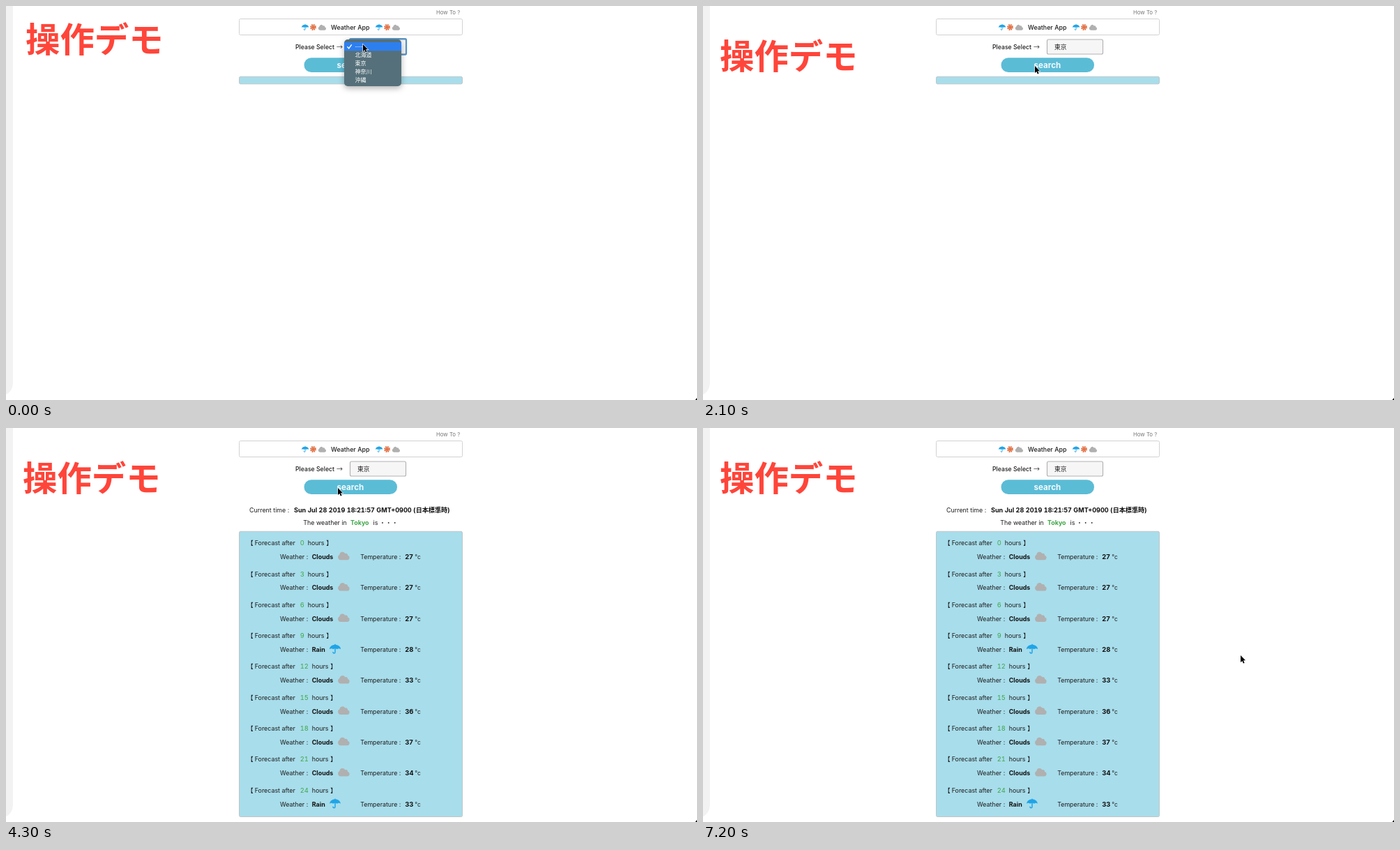
These frames come from a looping animation (991x565 px, 7.3 s). An HTML page:

```html
<!DOCTYPE html>
<html lang="ja">
<head>
<meta charset="utf-8">
<title>Weather App</title>
<style>
  html, body { margin: 0; width: 100%; height: 100%; overflow: hidden; background: #fff; }
  svg { display: block; width: 991px; height: 565px; }
  text { font: 8.9px Inter, "Noto Sans CJK JP", "Noto Sans CJK", sans-serif; fill: #1c1c1c; white-space: pre; }
  .b { font-weight: 700; fill: #111; }
  .g { fill: #3fa648; }
  .jp { font-family: "Noto Sans CJK JP", "Noto Sans CJK", sans-serif; }
  .panel { fill: #a8ddeb; stroke: #bfc6c8; }
</style>
</head>
<body>
<svg viewBox="0 0 991 565">
  <defs>
    <symbol id="cloud" overflow="visible">
      <path fill="#b0b0b0" d="M4 11.8a4 4 0 0 1-1.4-7.6A4.2 4.2 0 0 1 10.5 2.5A2.7 2.7 0 0 1 14.3 5.3A3.3 3.3 0 0 1 13.6 11.8z"/>
    </symbol>
    <symbol id="rain" overflow="visible">
      <path fill="#1fa5e8" d="M0 7.3A8 6.6 0 0 1 16 7.3Q13.4 5.2 10.8 7.3Q8 5.2 5.2 7.3Q2.6 5.2 0 7.3z"/>
      <path fill="none" stroke="#1fa5e8" stroke-width="1.5" stroke-linecap="round" d="M8 .6V1.5M8 6v5.6a1.5 1.5 0 0 1-3 0"/>
    </symbol>
    <symbol id="sun" overflow="visible">
      <circle r="3.5" fill="none" stroke="#e0683a" stroke-width="1.9" stroke-dasharray="1.65 1.1"/>
      <circle r="2.8" fill="#e0683a"/>
      <circle r="1.9" fill="none" stroke="#f0b49a" stroke-width=".5"/>
    </symbol>
    <g id="icons">
      <use href="#rain" transform="translate(424 26.2) scale(.63)"/>
      <use href="#sun" x="440.5" y="30.5"/>
      <use href="#cloud" transform="translate(447.6 26.7) scale(.68)"/>
    </g>
    <filter id="soft" x="-30%" y="-30%" width="160%" height="170%">
      <feDropShadow dx="0" dy="3" stdDeviation="4" flood-opacity=".3"/>
    </filter>
  </defs>

  <path fill="#f2f2f2" d="M0 0H10V541Q9 553 0 557z"/>
  <path d="M991 562V565H988.5z"/>
  <text id="title" class="jp" style="font-size:49.4px;font-weight:700;fill:#ff453a">操作デモ</text>

  <text x="617" y="12.3" style="font-size:7.8px;fill:#777">How To ?</text>
  <rect x="334.5" y="18.5" width="320" height="23" rx="2" fill="#fff" stroke="#d2d2d2"/>
  <use href="#icons"/>
  <use href="#icons" x="106"/>
  <text x="466" y="33.7" style="font-weight:500">Weather App</text>
  <text x="415" y="61.9" style="font-size:8.7px;font-weight:500">Please Select</text>
  <text x="474" y="61.9" class="jp" style="font-weight:500">→</text>

  <rect id="box" x="493.5" y="48" width="80" height="21" rx="2" fill="#f6f6f6" stroke="#b4b4b4" stroke-width="1.2"/>
  <rect id="ring" x="493" y="47.2" width="81" height="22.4" rx="1.5" fill="none" stroke="#5793c6" stroke-width="2.2"/>
  <text id="value" class="jp" x="504" y="61.8" style="font-size:8.7px;font-weight:500"></text>

  <rect x="427.5" y="74.3" width="133.5" height="20.8" rx="10.4" fill="#5bbcd6"/>
  <text x="474.5" y="88.8" class="b" style="font-size:11.6px;fill:#f4fbfd">search</text>

  <rect id="bar" class="panel" x="334.5" y="101.3" width="320" height="10.5" rx="2"/>
  <g id="result"></g>

  <g id="loader">
    <rect x="457" y="141" width="107" height="106.7" rx="10" fill="#717171"/>
    <g id="dots" fill="#b6b6b6"></g>
  </g>

  <g id="menu">
    <rect x="485" y="48" width="82" height="67" rx="5" fill="#54707a" filter="url(#soft)"/>
    <rect id="hover" x="485" width="82" height="12.2" fill="#2d7ff0"/>
    <path d="M489.5 58.3l2.2 2.6 4-5.6" fill="none" stroke="#fff" stroke-width="1.4"/>
    <g id="options"></g>
  </g>

  <path id="cursor" fill="#000" stroke="#fff" stroke-width="1.2" paint-order="stroke" d="M0 0V10L2.3 7.9L3.9 11.6L5.6 10.9L4 7.3H7z"/>
</svg>
<script>
const LOOP = 7300, STEP = 100;
const el = id => document.getElementById(id);
const show = (id, on) => el(id).style.display = on ? '' : 'none';
const text = (x, y, s, cls = '', style = '') =>
  `<text x="${x}" y="${y}" class="${cls}" style="${style}">${s}</text>`;

const places = ['-----', '北海道', '東京', '神奈川', '沖縄'];
el('options').innerHTML = places.map((p, i) =>
  text(500.5, 61 + 12 * i, p, 'jp', 'font-size:8px;font-weight:500;fill:#fff')).join('');

// Eight places on a circle, the upper right one left empty
el('dots').innerHTML = [0, 1, 2, 3, 4, 5, 6].map(i =>
  `<circle cx="21.8" r="5" transform="rotate(${45 * i})"/>`).join('');

const temps = [27, 27, 27, 28, 33, 36, 37, 34, 33];
function forecast(temp, i) {
  const y = 168.2 + 44.32 * i, y2 = y + 19.8;
  const hours = 3 * i, shift = hours > 9 ? 6 : 0, rain = i === 3 || i === 8;
  return text(345.7, y, '【', 'jp') + text(356.7, y, 'Forecast after') +
    text(421.7, y, hours, 'g', 'font-size:9.4px;font-variant-numeric:tabular-nums') +
    text(432.7 + shift, y, 'hours') + text(459.3 + shift, y, '】', 'jp') +
    text(393, y2, 'Weather :') + text(438.8, y2, rain ? 'Rain' : 'Clouds', 'b') +
    (rain ? `<use href="#rain" x="464" y="${y2 - 11}"/>`
          : `<use href="#cloud" x="475.8" y="${y2 - 10.5}"/>`) +
    text(508.3, y2, 'Temperature :', '', 'font-size:8.8px') +
    text(572.3, y2, temp, 'b', 'font-size:9.4px') + text(586.2, y2, '°c', '', 'font-size:8.4px');
}
el('result').innerHTML =
  text(349, 121.3, 'Current time :') +
  text(413, 121.3, 'Sun Jul 28 2019 18:21:57 GMT+0900 (日本標準時)', 'b',
    'font-size:9.1px;font-variant-numeric:tabular-nums') +
  text(426.3, 139.2, 'The weather in') + text(494, 139.2, 'Tokyo', 'b g') +
  text(526.5, 139.2, 'is') + text(535.5, 139.2, '・・・', 'jp') +
  '<rect class="panel" x="334.5" y="148.3" width="320" height="409.2" rx="2"/>' +
  temps.map(forecast).join('');

// time, x, y of the pointer; it starts on the open menu, then cuts to the right
const path = [
  [0, 512, 55], [100, 642, 92], [800, 520, 107], [900, 489, 138], [1000, 476, 126],
  [1200, 512, 55], [1300, 512, 56], [1500, 509, 80], [1600, 506, 81], [1900, 476, 86],
  [5000, 476, 86], [6000, 463, 303], [6200, 470, 306], [7000, 771, 326], [LOOP, 771, 326]
];
function pointer(t) {
  const n = path.findIndex(p => p[0] > t);
  const [t0, x0, y0] = path[n - 1], [t1, x1, y1] = path[n];
  const k = (t - t0) / (t1 - t0), e = k * k * (3 - 2 * k);
  return [x0 + (x1 - x0) * e, y0 + (y1 - y0) * e];
}

const within = (t, from, to) => t >= from && t < to;
function draw(t) {
  const opening = t < 100, focused = t < 1900, loaded = t >= 4100;
  const [x, y] = pointer(t);
  el('cursor').setAttribute('transform', `translate(${x} ${y})`);
  el('title').setAttribute('transform', opening ? 'translate(28 66)' : 'translate(24 89.5)');

  const row = Math.max(0, Math.min(4, Math.floor((y - 52) / 12)));
  el('hover').setAttribute('y', 52 + 12 * row);
  show('menu', opening || within(t, 1200, 1600));
  show('ring', focused);
  el('value').textContent = places[t < 1600 ? 0 : 2];

  show('loader', t >= 2300 && !loaded);
  el('dots').setAttribute('transform', `translate(510.6 194.2) rotate(${-8 + (t - 3000) / 2})`);
  show('bar', !loaded);
  show('result', loaded);
}

const start = performance.now();
function tick() {
  const t = (performance.now() - start) % LOOP;
  draw(Math.floor(t / STEP) * STEP);
  requestAnimationFrame(tick);
}
tick();
</script>
</body>
</html>
```
